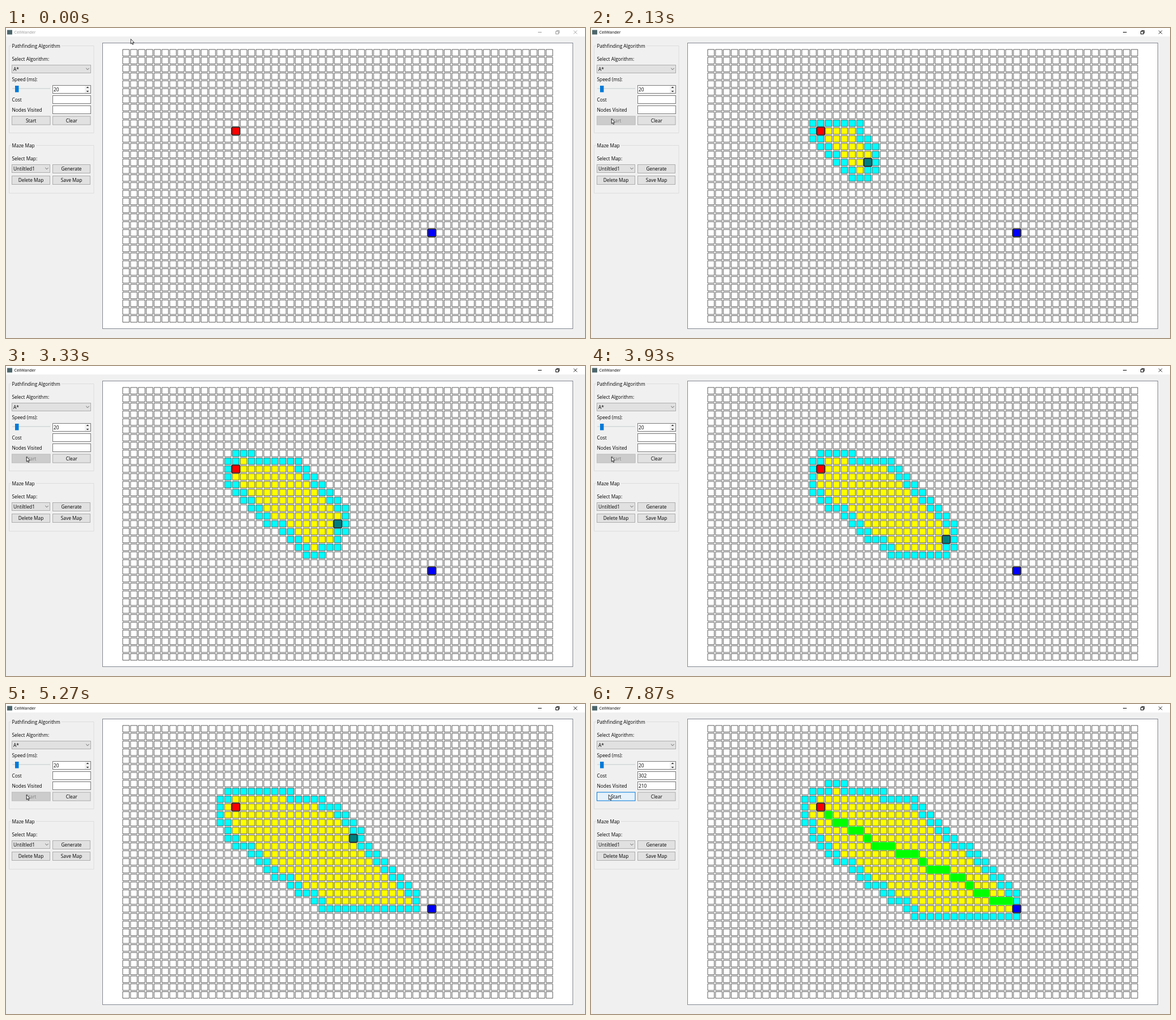
Write an HTML page with a canvas that moves like this. It is 1022 by 548 pixels and loops after 8.67 s.

```html
<!DOCTYPE html>
<html lang="en">
<head>
<meta charset="utf-8">
<title>CellWander</title>
<style>
  html, body { margin: 0; width: 100%; height: 100%; overflow: hidden; background: #f0f0f0; }
  canvas { display: block; }
</style>
</head>
<body>
<canvas id="stage" width="1022" height="548"></canvas>
<script>
const ctx = document.getElementById('stage').getContext('2d');
const LOOP = 8670, FPS = 15, STEP = 20.4;
const SEARCH_START = 1690, PATH_START = 6030, PATH_END = 6530;
const COLS = 55, ROWS = 35, PITCH = 13.84, LEFT = 211.8, TOP = 43.75;
const start = { col: 14, row: 10 }, goal = { col: 39, row: 23 };
const FONT = '"Open Sans", "Noto Sans", sans-serif';

// A* with 10/14 step costs; equal scores favour the cell farther from the goal.
function search() {
  const cells = Array.from({ length: COLS * ROWS }, (_, i) => ({
    col: i % COLS, row: Math.floor(i / COLS), g: Infinity, opened: Infinity, closed: Infinity
  }));
  const at = (col, row) => cells[row * COLS + col];
  for (const c of cells) c.h = Math.floor(10 * Math.hypot(c.col - goal.col, c.row - goal.row));
  const first = at(start.col, start.row), order = [];
  first.g = 0;
  const open = [first];
  while (open.length) {
    let best = 0;
    open.forEach((c, i) => {
      const b = open[best], diff = c.g + c.h - b.g - b.h;
      if (diff < 0 || (diff === 0 && c.h > b.h)) best = i;
    });
    const cell = open.splice(best, 1)[0];
    if (cell.h === 0) break;
    order.push(cell);
    cell.closed = order.length;
    for (let dy = -1; dy <= 1; dy++) for (let dx = -1; dx <= 1; dx++) {
      const next = at(cell.col + dx, cell.row + dy);
      if (next.closed < Infinity) continue;
      if (next.opened === Infinity) { next.opened = order.length; open.push(next); }
      next.g = Math.min(next.g, cell.g + (dx && dy ? 14 : 10));
    }
  }
  return { cells, order };
}
const { cells, order } = search();

// Route: number of cells in each row below the start, listed from the goal backwards.
const route = [];
let routeCol = start.col + 1;
[1, 2, 2, 1, 3, 3, 1, 3, 2, 1, 2, 3].forEach((run, i) => {
  while (run--) route.unshift({ col: routeCol++, row: start.row + 1 + i });
});

function box(x, y, w, h, fill, stroke) {
  ctx.fillStyle = fill;
  ctx.fillRect(x, y, w, h);
  if (!stroke) return;
  ctx.strokeStyle = stroke;
  ctx.lineWidth = 1;
  ctx.strokeRect(x + .5, y + .5, w - 1, h - 1);
}

function text(str, x, midY, { size = 8.35, color = '#000', align = 'left' } = {}) {
  ctx.font = `${size}px ${FONT}`;
  ctx.fillStyle = color;
  ctx.textAlign = align;
  ctx.fillText(str, x, midY + size * .36);
}

function line(points, color, width = 1) {
  ctx.beginPath();
  points.forEach(([x, y]) => ctx.lineTo(x, y));
  ctx.strokeStyle = color;
  ctx.lineWidth = width;
  ctx.stroke();
}

function button(label, x, y, w, fill = '#e1e1e1', border = '#adadad', color = '#000') {
  box(x, y, w, 16, fill, border);
  text(label, x + w / 2, y + 8, { color, align: 'center' });
}

function combo(label, x, y, w) {
  box(x, y, w, 15, '#e1e1e1', '#adadad');
  text(label, x + 3, y + 7.5);
  const cx = x + w - 6;
  line([[cx - 2.7, y + 6], [cx, y + 8.7], [cx + 2.7, y + 6]], '#555', .9);
}

function group(label, y, bottom, gap) {
  line([[gap, y], [155, y], [155, bottom], [5.5, bottom], [5.5, y], [9, y]], '#dcdcdc');
  text(label, 10.5, y + .5);
}

function titleBar(active) {
  const color = active ? '#000' : '#999';
  box(0, 0, 1022, 15, '#fff');
  box(2, 3.5, 9, 8, '#4d666b');
  text('CellWander', 14.5, 7.5, { size: 7.1, color });
  line([[939, 7.5], [945.5, 7.5]], color);
  ctx.strokeRect(970.5, 6, 4.6, 4.6);
  line([[972, 6], [972, 4.5], [976.6, 4.5], [976.6, 9], [975, 9]], color, .9);
  line([[1002, 4.5], [1008, 10.5]], color, .9);
  line([[1008, 4.5], [1002, 10.5]], color, .9);
}

function mix(a, b, p) {
  return `rgb(${a.map((v, i) => Math.round(v + (b[i] - v) * p))})`;
}

function panel(t) {
  const running = t >= 1730 && t < PATH_END;
  group('Pathfinding Algorithm', 31.5, 185.5, 98);
  text('Select Algorithm:', 10.5, 55);
  combo('A*', 10, 65, 140);
  text('Speed (ms):', 10.5, 91);
  box(11, 106, 67, 2, '#e7eaea', '#d9dcdc');
  box(16, 102, 6.5, 11.5, '#007ad9');

  box(82, 101, 68, 15, '#fff', '#7a7a7a');
  text('20', 84, 108.5);
  box(139, 102, 10, 13, '#f0f0f0');
  ctx.fillStyle = '#222';
  for (const dir of [-1, 1]) {
    const y = 108.5 + dir * 2.4;
    ctx.beginPath();
    ctx.moveTo(141.7, y);
    ctx.lineTo(146.3, y);
    ctx.lineTo(144, y + dir * 2.4);
    ctx.fill();
  }

  text('Cost', 10.5, 127);
  text('Nodes Visited', 10.5, 145);
  box(82, 119, 68, 15, '#fff', '#7a7a7a');
  box(82, 137, 68, 15, '#fff', '#7a7a7a');
  if (t >= PATH_START) {
    text('302', 84, 127);
    text('210', 84, 145);
  }

  if (running) button('Start', 10, 155.5, 68.5, '#ccc', '#bfbfbf', '#838383');
  else {
    const hover = Math.min(1, Math.max(0, (t - 866) / 200));
    button('Start', 10, 155.5, 68.5,
      mix([225, 225, 225], [229, 241, 251], hover), mix([173, 173, 173], [0, 120, 215], hover));
  }
  button('Clear', 82, 155.5, 67.5);

  group('Maze Map', 207.5, 292, 53);
  text('Select Map:', 10.5, 230.5);
  combo('Untiltled1', 10, 241, 68);
  button('Generate', 82, 241, 67);
  button('Delete Map', 10, 261, 68);
  button('Save Map', 82, 261, 67);
}

function square(cell, side, fill, stroke, width) {
  const x = LEFT + cell.col * PITCH - side / 2, y = TOP + cell.row * PITCH - side / 2;
  ctx.fillStyle = fill;
  ctx.fillRect(x, y, side, side);
  if (!width) return;
  ctx.strokeStyle = stroke;
  ctx.lineWidth = width;
  ctx.strokeRect(x, y, side, side);
}

function grid(t) {
  const steps = Math.max(0, Math.floor((t - SEARCH_START) / STEP));
  const found = Math.max(0, Math.floor((t - PATH_START) / STEP));
  const marker = (cell, color) => square(cell, 13.6, color, '#2b2b2b', 1.6);
  box(170, 26, 831, 506, '#fff', '#828790');
  ctx.lineJoin = 'round';
  for (const c of cells) {
    const fill = c.closed <= steps ? '#ff0' : c.opened <= steps ? '#0ff' : '#fff';
    square(c, 11.6, fill, '#484848', .9);
  }
  route.slice(0, found).forEach(c => square(c, 14.2, '#0f0'));
  if (steps > 0 && steps < order.length) marker(order[steps - 1], '#008080');
  marker(start, '#f00');
  marker(goal, '#00f');
  ctx.lineJoin = 'miter';
}

function cursor(t) {
  const p = Math.min(1, t / 933), ease = p * p * (3 - 2 * p);
  const shift = 5 * Math.min(1, Math.max(0, (t - 7733) / 133));
  ctx.save();
  ctx.translate(220.3 - 184 * ease - shift, 19.5 + 141 * ease);
  ctx.beginPath();
  [[0, 0], [0, 8.6], [1.9, 6.9], [3.2, 9.9], [4.5, 9.3], [3.2, 6.4], [5.8, 6.2]]
    .forEach(([x, y]) => ctx.lineTo(x, y));
  ctx.closePath();
  ctx.fillStyle = '#fff';
  ctx.fill();
  ctx.strokeStyle = '#000';
  ctx.lineWidth = .8;
  ctx.stroke();
  ctx.restore();
}

function draw(now) {
  // The screen updates 15 times a second.
  const t = Math.floor((now % LOOP + 4) * FPS / 1000) * 1000 / FPS;
  box(0, 0, 1022, 548, '#f0f0f0');
  titleBar(t >= 1730);
  panel(t);
  grid(t);
  cursor(t);
}

const began = performance.now();
function tick() {
  draw(performance.now() - began);
  requestAnimationFrame(tick);
}
tick();
</script>
</body>
</html>
```
